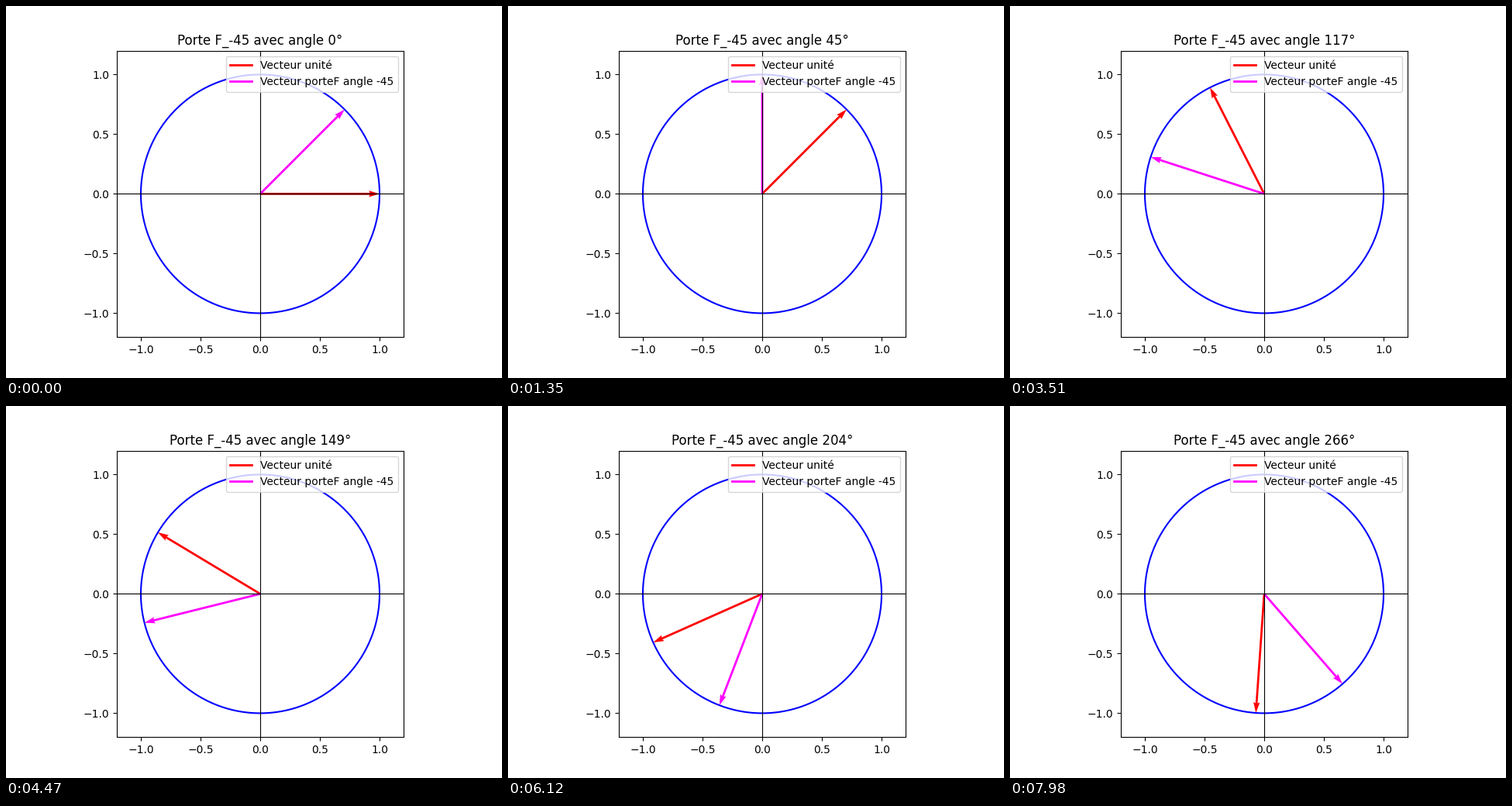
Write a matplotlib script that moves like this. It is 640 px wide and 480 px high and loops after 8 s.

```python
import numpy as np
import matplotlib.pyplot as plt
from matplotlib.animation import FuncAnimation

LOOP_MS = 8000
FRAMES = 267          # one degree per frame
SHIFT = 45            # lead of the second vector, in degrees

fig, ax = plt.subplots(figsize=(6.4, 4.8), dpi=100)
ax.set_aspect("equal")
ax.set_xlim(-1.2, 1.2)
ax.set_ylim(-1.2, 1.2)

t = np.linspace(0, 2 * np.pi, 200)
ax.plot(np.cos(t), np.sin(t), color="blue", lw=1.5)
ax.axhline(0, color="black", lw=0.8)
ax.axvline(0, color="black", lw=0.8)


def direction(deg):
    a = np.radians(deg)
    return np.cos(a), np.sin(a)


def vector(deg, color, label):
    ax.plot([], [], color=color, lw=2, label=label)
    return ax.quiver(0, 0, *direction(deg), color=color,
                     angles="xy", scale_units="xy", scale=1)


unit = vector(0, "red", "Vecteur unité")
gate = vector(SHIFT, "magenta", "Vecteur porteF angle -45")
ax.legend(loc="upper right")
title = ax.set_title("")


def update(deg):
    unit.set_UVC(*direction(deg))
    gate.set_UVC(*direction(deg + SHIFT))
    title.set_text(f"Porte F_-45 avec angle {deg}°")
    return unit, gate, title


anim = FuncAnimation(fig, update, frames=FRAMES, init_func=lambda: update(0),
                     interval=LOOP_MS / FRAMES, repeat=True, repeat_delay=0)
plt.show()
```
